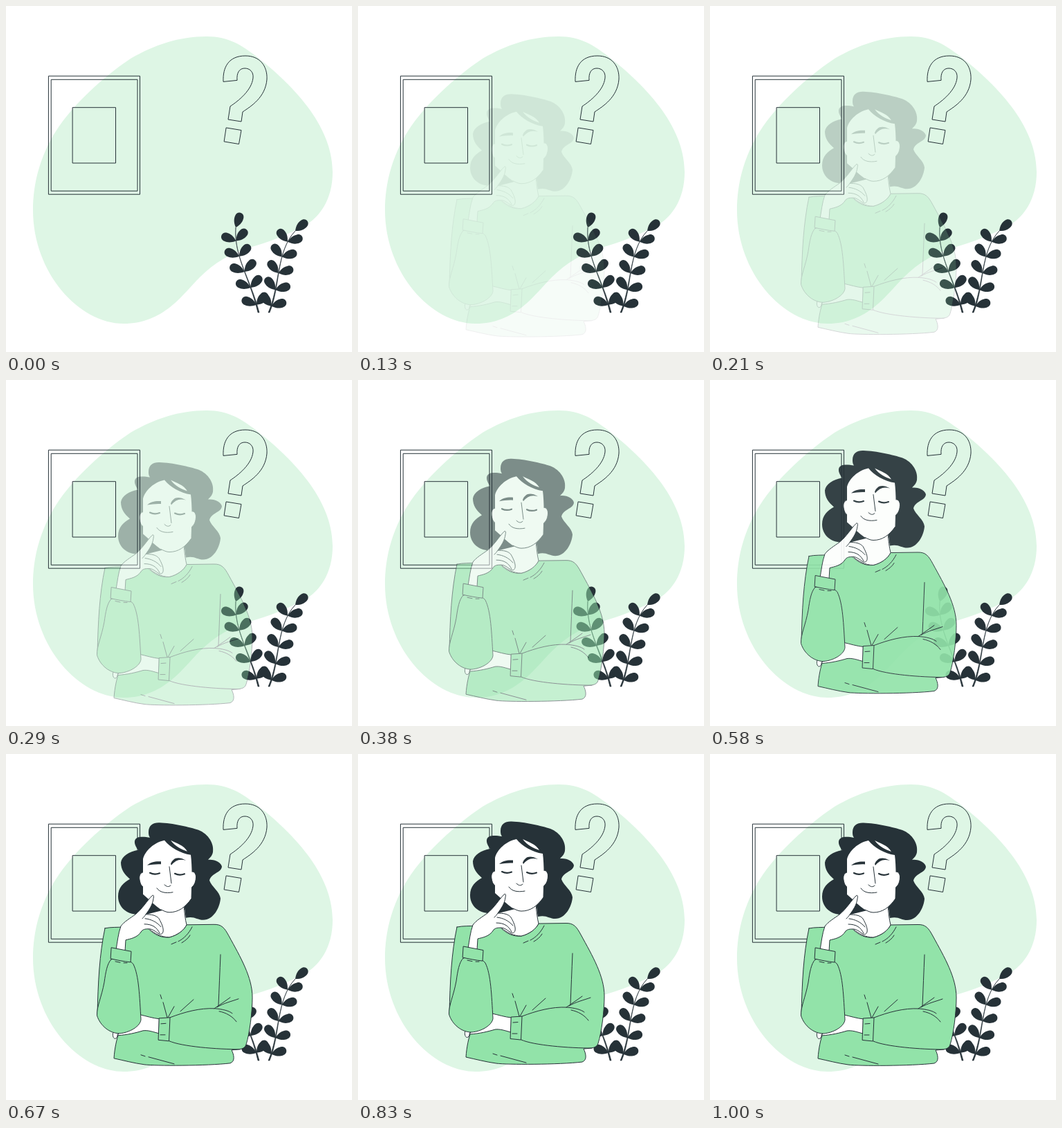
An HTML page for the animation above (1.04 s loop, 500 px wide and 500 px high).

```html
<!DOCTYPE html>
<html lang="en">
<head>
<meta charset="utf-8">
<title>Thinking</title>
<style>
  html, body { margin: 0; width: 100%; height: 100%; overflow: hidden; background: #fff; }
  svg { display: block; width: 100%; height: 100%; }
  .line { fill: none; stroke: #263238; stroke-width: 1; stroke-linecap: round; stroke-linejoin: round; }
  .bold { stroke-width: 2.2; }
  .skin { fill: #fff; }
  .knit { fill: #92e3a9; }
  .dark { fill: #263238; }
</style>
</head>
<body>
<svg viewBox="0 0 500 500">
  <path fill="#def6e5" d="M39 295C39 255 50 216 72 181C98 141 140 103 180 76C215 56 250 44 290 44C322 44 341 57 362 73C400 103 472 165 472 240C472 281 452 304 437 314C405 332 380 341 352 349C325 357 301 371 280 392C255 417 228 459 170 459C105 459 39 385 39 295Z"/>

  <g class="line">
    <rect x="61.8" y="101.2" width="131.700" height="171"/>
    <rect x="65.6" y="106.3" width="124.400" height="161"/>
    <rect x="96.5" y="146.7" width="62" height="80.300"/>
    <path d="M314 109C313 88 322 72 346 72C367 72 378 87 377 106C375 132 354 145 342 153L340 167L321 164L324 145C336 137 355 122 357 104C358 95 352 90 345 90C337 90 333 97 334 107Z"/>
    <path d="M318.500 176L340 179.500L336.500 199.500L315.500 196Z"/>
  </g>

  <g class="dark" id="plant"></g>

  <g id="person">
    <!-- hair -->
    <path class="dark" d="M206 113C206 103 213 99 222 99.500C240 100 266 106 278 110C293 116 301 130 299 142C298 147 296 149 292 153C302 152 311 157 312 163C311 172 297 172 294 183C297 192 309 199 310 209C309 222 300 240 285 240C276 240 272 234 260 237L212 236L190 232C175 232 162 222 162 206C162 193 170 186 179 181C171 174 166 167 166 157C167 148 178 141 191 139C186 133 183 124 190 121C195 119 202 120 208 121C206 118 206 116 206 113Z"/>

    <!-- sweater and neck -->
    <path class="line knit" d="M143 252C152 250 162 251 170 250L205 252C215 262 225 266 236 265C248 262 257 255 261 247L300 246.500C312 246 316 252 322 263C339 294 356 323 356 352C356 372 352 405 347 420C345 427 338 427 326 428C329 434 332 444 324 447C290 451 215 451 200 449C185 447 170 443 156 440C157 425 160 412 163 404L132 378C133 330 135 290 143 252Z"/>
    <path class="skin" d="M203 232L227 226L257 215L261 247C257 255 248 262 236 265C222 265 212 259 205 252Z"/>
    <path class="line" d="M257 219C258 230 259 239 261 247C257 255 248 262 236 265C224 265 214 259 208 254"/>

    <!-- head -->
    <path class="line skin" d="M267 171C271 168 275 173 274.500 179C274 187 271 191 268 193M198 171C194 172 192 176 193 182C194 188 196 191 198 192"/>
    <path class="skin" d="M198 152C201 140 214 128 229 125C237 135 252 144 267 146C269 162 269 185 268 209C259 222 249 229 236 229C224 229 212 215 198 203Z"/>
    <path class="line" d="M268.500 193L268 209C259 222 249 229 236 229C232 229 228 227 224 225"/>
    <path class="skin" d="M238 125C246 129 257 132 262 141C253 138 245 134 238 125Z"/>
    <path class="dark" d="M204 161C209 156 216 155 224 155.500L224 159.500C217 159 211 160 204 161ZM238 159C241 151 248 147 260 154C250 151.500 245 154 239 161Z"/>
    <path class="line" d="M236 163L239 187M229 189C232 192 235 193 238 190M218 194C222 200 230 202 241 200"/>
    <path class="line bold" d="M208 172C212 174 218 174 222 172.500M244 173C248 175 254 175 258 173.500"/>

    <!-- folds -->
    <path class="line" d="M310 290C309 315 308 340 307 364M301 368L317 357L324 352M305 366C315 360 325 358 336 354M223 348L225 354M227 359L233 381M271 355L252 372M243 365L234 381M239 275L246 272M269 250C264 260 257 267 249 271M266 262C263 267 259 270 254 273M195 435L201 437M206 438L243 448"/>

    <!-- lower arm -->
    <path class="line skin" d="M155 402C153 408 156 413 159 411C161 410 161 407 162 404"/>
    <path class="line skin" d="M194 377C203 379 212 382 222 383L221 404C213 402 206 399 198 400C188 403 176 406 161 407L164 402Z"/>
    <path class="line knit" d="M221.500 382L237 381L235.500 415L220.500 413.500Z"/>
    <path class="line" d="M237 381C258 373 280 367 302 368C313 369 322 371 327 375M308 372C318 374 327 379 333 387M236 415C254 423 305 427 338 427M224 390L231 389.500M223 406L230 406"/>

    <!-- raised arm -->
    <path class="line knit" d="M152 297C146 303 144 316 142 330C138 352 131 365 131.500 378C136 393 150 404 164 404C178 403 194 394 195 384C193 350 192 320 184 304C180 297 160 294 152 297Z"/>
    <path class="line skin" d="M159 283C161 272 162 260 166 249C170 243 180 237 187 232C197 224 204 212 211 205C213 203 214 205 213 209C212 218 207 225 202 232C210 232 217 233 221 238C225 245 228 252 227 257C226 261 223 261 221 260C216 257 212 253 207 253C202 253 199 253 196 256C190 266 180 267 173 269L172 285"/>
    <path class="line" d="M202 232C200 235 199 236 197 238M201 238C210 239 218 243 224 250M200 246C212 246 218 251 222 259"/>
    <path class="line knit" d="M152.500 280L181 285.500L180 301C170 300 160 298 151.500 296Z"/>
    <path class="line" d="M158 300L165 301.500M170 302L175 302"/>
  </g>
</svg>
<script>
  const LOOP = 1040, FPS = 24, RISE = 30;
  const PAIRS = 5, SPREAD = 56, LEAF = 22.5;
  const person = document.getElementById('person');

  const bezier = (a, b, c, d, u) =>
    (1 - u) ** 3 * a + 3 * (1 - u) ** 2 * u * b + 3 * (1 - u) * u * u * c + u ** 3 * d;

  const leaf = (x, y, angle) =>
    `<path transform="translate(${x} ${y}) rotate(${angle}) scale(${LEAF})"
      d="M0 0C.3 -.26 .5 -.29 .7 -.28C1.1 -.27 1.1 .27 .7 .28C.5 .29 .3 .26 0 0Z"/>`;

  // A tapered stem from tip to root, with evenly spaced pairs of leaves.
  function branch([x0, y0], [x1, y1], [x2, y2], [x3, y3], lean) {
    let shapes = `<path stroke="#263238" stroke-width=".6" d="M${x0} ${y0}
      C${x1} ${y1} ${x2} ${y2} ${x3 - 1} ${y3}h2C${x2 + 1} ${y2} ${x1} ${y1} ${x0} ${y0}Z"/>`;
    shapes += leaf(x0, y0, lean + 32);
    for (let i = 0; i < PAIRS; i++) {
      const u = .16 + .19 * i;
      const x = bezier(x0, x1, x2, x3, u), y = bezier(y0, y1, y2, y3, u);
      shapes += leaf(x, y, lean - SPREAD) + leaf(x, y, lean + SPREAD);
    }
    return shapes;
  }

  document.getElementById('plant').innerHTML =
    branch([332, 320], [329, 362], [353, 395], [365, 443], -103) +
    branch([418, 325], [390, 355], [396, 405], [380, 443], -72);

  // cubic-bezier(.36, -.01, .5, 1.38): rises past its rest position and settles
  function ease(x) {
    if (x >= 1) return 1;
    let low = 0, high = 1;
    for (let i = 0; i < 30; i++) {
      const mid = (low + high) / 2;
      if (bezier(0, .36, .5, 1, mid) < x) low = mid; else high = mid;
    }
    return bezier(0, -.01, 1.38, 1, low);
  }

  const stepStart = n => 10 * Math.round(n * 100 / FPS);

  function draw(time) {
    let step = 0;
    while (stepStart(step + 1) <= time) step++;
    const progress = step < 3 ? 0 : ease((step + .5) / FPS);
    person.setAttribute('opacity', Math.min(1, progress));
    person.setAttribute('transform', `translate(0 ${RISE * (1 - progress)})`);
  }

  const start = performance.now();
  function tick() {
    draw((performance.now() - start) % LOOP);
    requestAnimationFrame(tick);
  }
  tick();
</script>
</body>
</html>
```
